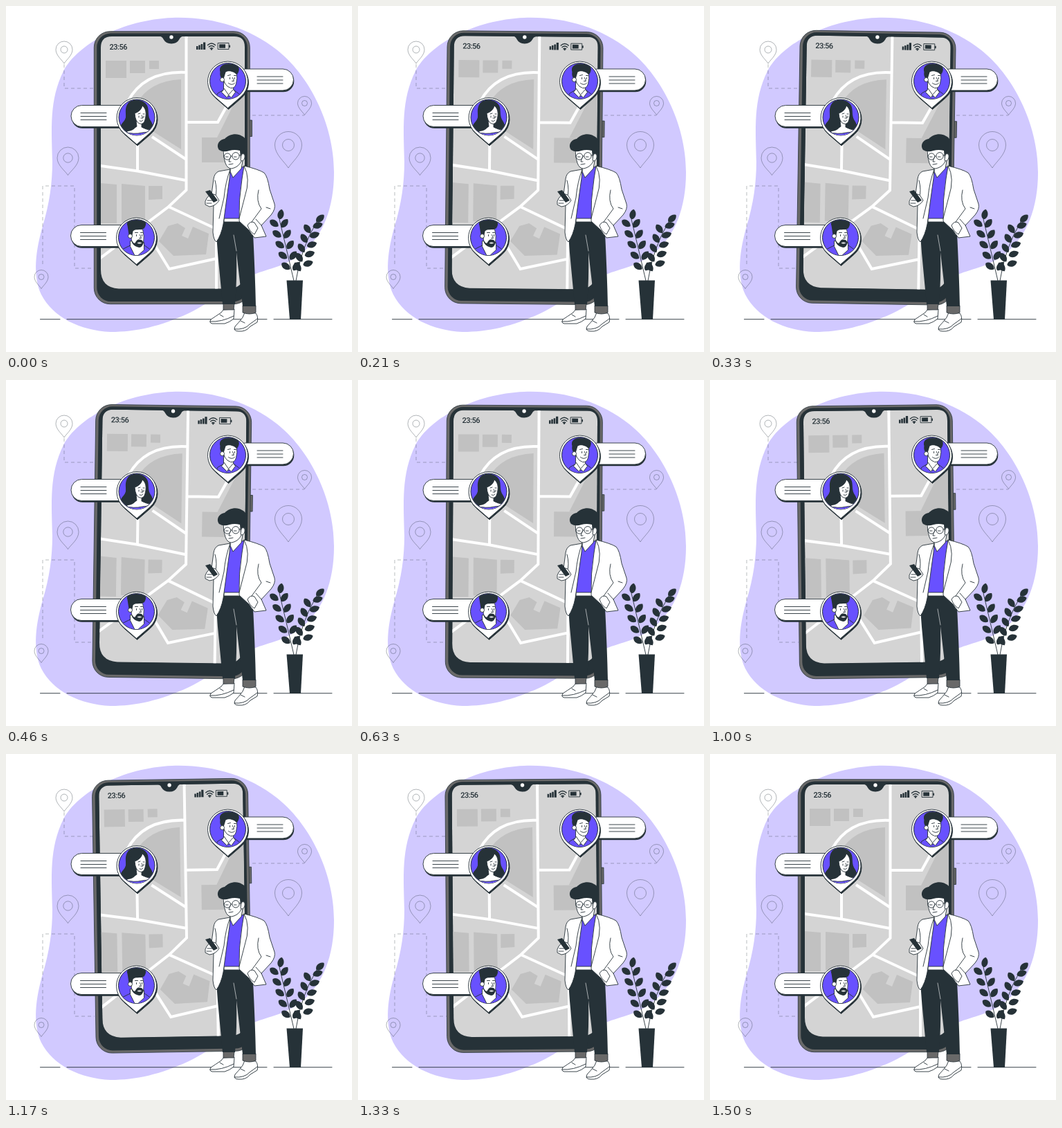
These frames come from a looping animation (500 by 500 pixels, 1540 ms). An HTML page:

```html
<!DOCTYPE html>
<html lang="en">
<head>
<meta charset="utf-8">
<title>Friends on the map</title>
<style>
html, body { margin: 0; width: 100%; height: 100%; overflow: hidden; background: #fff; }
svg { display: block; width: 100vw; height: 100vh; }
.ink { fill: #263238; }
.line { fill: none; stroke: #263238; stroke-width: .9; stroke-linecap: round; stroke-linejoin: round; }
.wave { stroke-width: 1.4; }
.crease { stroke: #fff; stroke-width: .6; }
.accent { fill: #6851ff; }
.white { fill: #fff; }
.drawn { fill: #fff; stroke: #263238; stroke-width: .9; stroke-linejoin: round; }
.metal { fill: #696969; stroke: #263238; stroke-width: .8; }
.marker { fill: none; stroke: #263238; stroke-opacity: .48; stroke-width: .75; }
.dash { fill: none; stroke: #263238; stroke-opacity: .36; stroke-width: .9; stroke-dasharray: 5 4; }
.block { fill: #c1c1c1; }
.road { fill: none; stroke: #fff; stroke-width: 4; }
.clock { font: 500 11px Roboto, "Liberation Sans", sans-serif; letter-spacing: -.5px; }
</style>
</head>
<body>
<svg viewBox="0 0 500 500">
  <defs>
    <clipPath id="screenClip"><path d="M153 44H330Q345 44 345 59V383Q345 408.500 320 408.500H163Q137 407 137 381V60Q137 44 153 44Z"/></clipPath>
    <clipPath id="faceClip"><circle r="25.6"/></clipPath>
  </defs>

  <path fill="#d1c9ff" d="M240 17C297 15 350 31 391 63C437 99 474 169 474 240C474 292 458 332 429 356C405 376 381 379 358 388C322 403 300 427 264 444C223 463 188 471 151 471C107 469 68 450 51 417C38 389 43 353 53 318C63 285 67 255 67 225C66 177 62 137 83 94C104 55 168 20 240 17Z"/>

  <g id="markers"></g>
  <path class="dash" d="M84 84V119H127M53 373V260H99V379H128M356 158H431"/>
  <path class="line" d="M49.500 452.700H78M88 452.700H377M387 452.700H471"/>

  <g id="phone">
    <path class="metal" d="M350 165H355.500V188.500H350Z"/>
    <rect class="metal" x="127.300" y="36.700" width="225" height="394" rx="23"/>
    <rect class="ink" x="131.300" y="39.500" width="217.500" height="387.500" rx="20"/>
    <g clip-path="url(#screenClip)">
      <rect x="130" y="40" width="220" height="375" fill="#d4d4d4"/>
      <path class="block" d="M350 100V190H305Z"/>
      <path class="block" d="M144 79H174V104H144ZM179 79H201V97H179ZM207 79H221V91H207ZM283 190H318V226H283ZM137 256L160 258V314H137ZM167 257L201 260V312H167ZM206 260H226V279L206 280Z"/>
      <path class="block" d="M188 142Q207 108 253 106V207L212 181Z"/>
      <path class="block" d="M221 340L234 318L248 314L259 321L254 332L263 336L270 319L293 329L289 359L242 361Z"/>
      <path class="road" d="M260.500 40V266L235 290L134 366M134 230.500L190 238.500L260 252M190 195V238M176 138Q200 93 261 96M211 189L260 221.500M261 168H306L322 139M235 290L308 324M214 344L236 380L304 365M304 318V412"/>
    </g>
    <path class="ink" d="M220 43H258Q252 44 250.500 48Q247 54.500 239 54.500Q231 54.500 227.500 48Q226 44 220 43Z"/>
    <circle class="white" cx="239" cy="45" r="2.700"/>
    <text class="clock ink" x="149.500" y="62.500">23:56</text>
    <path class="ink" d="M275 58H277.500V63H275ZM278.300 56.500H280.800V63H278.300ZM281.600 55H284.200V63H281.600ZM285 52.500H288.200V63H285Z"/>
    <path class="line wave" d="M291.500 56.500Q297 51.500 302.500 56.500M293.300 59Q297 55.800 300.700 59M295.200 61.300Q297 60 298.800 61.300"/>
    <circle class="ink" cx="297" cy="62.500" r="1.200"/>
    <rect class="line" x="306.500" y="53.500" width="15.500" height="9"/>
    <path class="ink" d="M308.200 55.200H317V60.800H308.200ZM322.300 56.500H324V60H322.300Z"/>
  </g>

  <g id="cards"></g>

  <g transform="translate(189 161)" clip-path="url(#faceClip)">
    <path class="ink" d="M-13-20C-9-27 7-27 13-20C19-14 15-5 19 3C24 10 26 18 19 21L-14 22C-27 24-26 12-19 7C-12 1-20-10-13-20Z"/>
    <path class="drawn" d="M-1 5L0 13C-4 17-10 17-14 20L-16 30H27L22 19Q12 17 7 14V8Z"/>
    <path class="drawn" d="M-3-6C3-8 7-12 8-17C14-12 14-5 12 3Q10 11 4 9Q-2 7-3-6Z"/>
    <path class="line" d="M2-5L5-6M9-5L11-5M3-2V0M10-2V0M7-3L9 1L6 1M4 5Q7 7 9 4"/>
    <path class="accent line" d="M-18 21Q-4 25 8 22L24 20V30H-18Z"/>
    <path class="ink" d="M-8-14C-4-5-9 2-4 8C0 14-3 19-13 20C-22 21-26 13-20 7C-13 1-18-8-8-14Z"/>
  </g>

  <g transform="translate(320.500 108.500)" clip-path="url(#faceClip)">
    <path class="accent line" d="M-18 30L-15 18L-5 12L9 13L18 20L19 30Z"/>
    <path class="drawn" d="M-6 1V12L1 22L9 15L7 7Z"/>
    <path class="drawn" d="M-8-10Q-2-17 6-15L13-12Q14-4 12 4Q10 11 4 10Q-6 7-8-10Z"/>
    <path class="ink" d="M-11-13C-14-22-5-26 4-25C9-28 20-22 15-12L13-9C10-13 2-16-3-13L-6-3C-10-3-12-8-11-13Z"/>
    <circle class="drawn" cx="-8" cy="-2" r="3"/>
    <path class="line" d="M0-8L4-9M9-8L12-8M3-5V-3M10-5V-3M7-5L9 0L6 0M1 3Q6 7 10 3"/>
    <path class="drawn" d="M-5 11L-9 16L-1 24L1 20L5 24L11 16L8 12L1 20Z"/>
  </g>

  <g transform="translate(188.500 334.500)" clip-path="url(#faceClip)">
    <path class="accent line" d="M-25 30L-20 17L-8 11H11L22 19L24 30Z"/>
    <path class="drawn" d="M-9 5V13L-1 29L11 18V7Z"/>
    <path class="drawn" d="M-9-12H9Q12-1 10 8Q6 15-1 12Q-9 8-9-12Z"/>
    <path class="ink" d="M-13-17C-16-24-7-28 2-27C12-28 17-21 11-13C4-10-1-13-5-9L-7 2L-11-4Z"/>
    <circle class="drawn" cx="-9" cy="-2" r="3"/>
    <path class="ink" d="M-8 3Q-5 9-2 8Q1 2 5 3Q9 3 10 8Q8 16 2 14Q-6 12-8 3Z"/>
    <path class="white" d="M1 8Q4 6 8 8Q4 10 1 8Z"/>
    <path class="line" d="M-2-7L2-7M6-7L9-7M0-4V-2M8-4V-2M5-4L7 1L4 1"/>
  </g>

  <g id="plant">
    <path class="ink" d="M405.500 396.500H429L426 453H410Z"/>
    <path class="line" d="M416 397Q405 350 395 308M419 397Q426 350 449 312"/>
    <g id="leaves" class="ink"></g>
  </g>

  <g id="hero">
    <path class="drawn" d="M314 439L311 443Q302 449 296 453Q293 458 298 459H316Q323 457 329 452L330 438Z"/>
    <path class="drawn" d="M345 443L342 450Q336 458 331 463Q328 470 336 470Q347 471 353 463L363 457Q365 449 361 444Z"/>
    <path class="line" d="M295 456Q311 457 329 448M330 467Q345 468 352 460L363 452M309 446L314 449M339 455L345 458"/>
    <path class="metal" d="M314 430H330L329 439L314 439ZM342 433L361 433L361 443Q352 447 342 443Z"/>
    <path class="ink" d="M308 307H351L357 328Q360 388 361 434L342 434L333 356Q334 394 331 431L313 431Q309 389 306 357Q303 329 308 307Z"/>
    <path class="line crease" d="M333 354L329 331M350 319Q353 325 355 330"/>
    <path class="accent line" d="M324 238L344 232L338 309H314Z"/>
    <path class="drawn" d="M315 307H338V312H315Z"/>
    <path class="drawn" d="M323 223L324 239L328 248L340 235L343 218Z"/>
    <path class="drawn" d="M324 236L307 239Q301 242 300 250L297 272L291 278L290 286L300 288L299 327Q300 338 304 341Q311 331 314 315Q320 270 323 249Z"/>
    <path class="drawn" d="M344 231Q365 236 373 241Q378 246 381 265L388 286Q390 293 383 302L369 317L376 333L359 335L351 324L337 311Q336 280 341 250Z"/>
    <path class="line" d="M324 236Q317 255 315 277L308 307M344 231Q354 249 345 276L337 307M365 266Q361 282 369 293L355 312M376 291L382 293M302 252Q306 266 302 279M369 317L361 308"/>
    <path class="drawn" d="M349 317Q353 310 359 313L364 321L359 330Q352 326 349 317Z"/>
    <path class="drawn" d="M290 278Q287 282 288 287L294 290Q303 289 308 281L303 273L296 271Z"/>
    <path class="ink" d="M288 268L295 266L306 281L300 284Z"/>
    <path class="line" d="M291 281L298 281M290 285L297 285"/>
    <path class="drawn" d="M314 207Q314 219 317 227Q320 235 326 235Q337 233 341 222L343 205Q328 202 314 207Z"/>
    <path class="ink" d="M308 208C303 201 308 193 316 192C322 185 334 183 341 188C350 192 349 203 346 211L343 222L339 220L338 209Q330 207 323 209Q314 212 308 208Z"/>
    <path class="drawn" d="M340 214Q346 212 345 219Q343 226 339 223Z"/>
    <circle class="drawn" cx="320" cy="217.500" r="4.700"/>
    <circle class="drawn" cx="332" cy="216.800" r="5.200"/>
    <path class="line" d="M324.700 217H326.800M337 216L341 215M317.500 218H321M329.500 218H333M324 219L322 225L325 225M322 229L328 228"/>
  </g>
</svg>
<script>
const $ = id => document.getElementById(id);

const marker = ([x, y, r, h, hole]) => `<g class="marker" transform="translate(${x} ${y})">
  <path d="M0 ${h}C${-r * .25} ${h * .75} ${-r} ${r * .7} ${-r} 0A${r} ${r} 0 1 1 ${r} 0C${r} ${r * .7} ${r * .25} ${h * .75} 0 ${h}Z"/>
  <circle r="${hole}"/></g>`;
$('markers').innerHTML = [
  [84, 63, 12, 20, 5], [89.5, 219.5, 15.5, 25, 6.7], [51, 391.5, 10, 17, 4],
  [408, 201, 19.5, 33, 8.5], [431.5, 140.5, 10, 17, 4]
].map(marker).join('');

// Label pill, drop-shaped frame and portrait disc.
function card([x, y, pillX, pillY, pillW, lineX]) {
  const pill = `x="${pillX}" y="${pillY}" width="${pillW}" height="31" rx="15.5"`;
  const drop = 'M0 39L-19 22.5A29 29 0 1 1 19 22.5Z';
  const rows = [11, 16, 21].map(d => `M${lineX} ${pillY + d}h37`).join('');
  return `<rect class="ink" ${pill} transform="translate(.8 2.2)"/><rect class="drawn" ${pill}/>
    <path class="line" d="${rows}"/>
    <g transform="translate(${x} ${y})">
      <path class="ink" stroke="#263238" d="${drop}" transform="translate(1 1.8)"/>
      <path class="drawn" d="${drop}"/>
      <circle class="accent" r="26" stroke="#263238"/>
    </g>`;
}
$('cards').innerHTML = [
  [189, 161, 94, 143.5, 90, 108],
  [320.5, 108.5, 330, 91, 85.5, 363],
  [188.5, 334.5, 93.5, 316.5, 90, 107.5]
].map(card).join('');

const leaf = ([x, y], turn) =>
  `<path transform="translate(${x} ${y}) rotate(${turn})" d="M-7.5 0C-5-6 4-6 7.5 0C4 6-5 6-7.5 0Z"/>`;
// Leaf pairs follow a curve up each stem; drop lowers the left leaf of a pair.
const stems = [
  { base: [412, 376], mid: [403, 345], top: [395, 314], end: [397, 301], endTurn: -78, turns: [35, -52], drop: 0 },
  { base: [429, 372], mid: [433, 345], top: [443, 317], end: [454, 307], endTurn: -42, turns: [55, -18], drop: 5 }
];
$('leaves').innerHTML = stems.map(({ base, mid, top, end, endTurn, turns, drop }) => {
  let out = leaf(end, endTurn);
  for (let i = 0; i < 5; i++) {
    const u = i / 4, v = 1 - u;
    const [x, y] = [0, 1].map(k => v * v * base[k] + 2 * u * v * mid[k] + u * u * top[k]);
    out += leaf([x - 7.5, y + drop], turns[0]) + leaf([x + 7.5, y], turns[1]);
  }
  return out;
}).join('');

// Linear sway: 0 -> 1 -> -1 -> 0 degrees, shown at 24 steps a second.
const LOOP = 1540, SWAY = 1500, STEP = 1000 / 24;
function angle(ms) {
  const p = ms / SWAY % 1;
  return p < .25 ? 4 * p : p < .75 ? 2 - 4 * p : 4 * p - 4;
}
const phone = $('phone');
const start = performance.now();
function draw(now) {
  const t = Math.max(0, now - start) % LOOP;
  const shown = Math.floor((t + 6) / STEP) * STEP;
  phone.setAttribute('transform', `rotate(${angle(shown).toFixed(3)} 241.5 233.5)`);
  requestAnimationFrame(draw);
}
draw(start);
</script>
</body>
</html>
```
